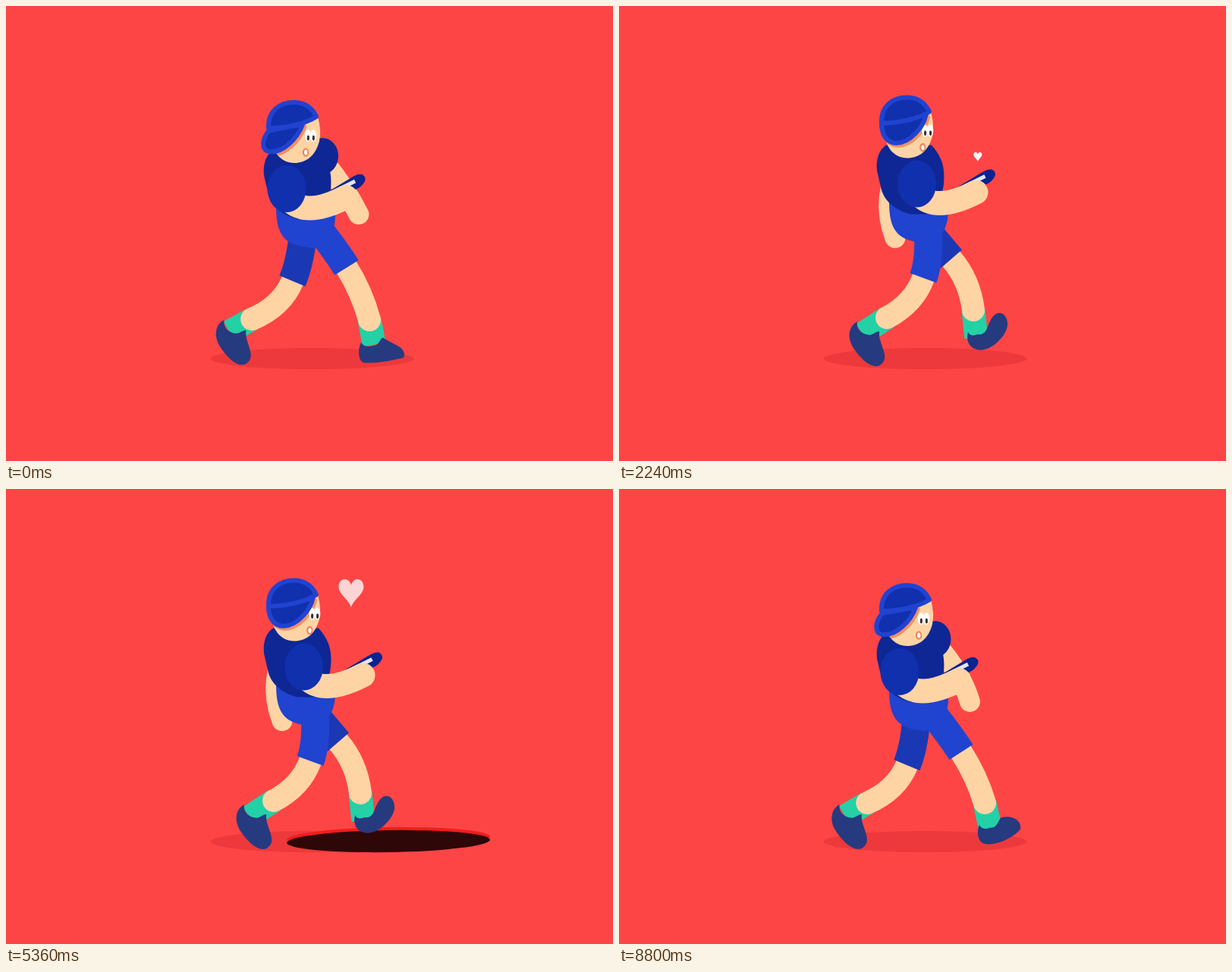
These frames come from a looping animation (800x600 px, 8.84 s). An HTML page with a canvas:

```html
<!DOCTYPE html>
<html lang="en">
<head>
<meta charset="utf-8">
<title>Walking with a phone</title>
<style>
html, body { margin: 0; width: 100%; height: 100%; overflow: hidden; background: #fe4545; }
canvas { display: block; }
</style>
</head>
<body>
<canvas id="stage" width="800" height="600"></canvas>
<script>
const ctx = document.getElementById('stage').getContext('2d');
const TAU = Math.PI * 2, STEP = 40, FRAMES = 221, CYCLE = 39, SPEED = 11.26;
const C = {
  bg: '#fe4545', shade: '#ed393b', shirt: '#0e2795', sleeve: '#1030ae', blue: '#2043d0',
  farShort: '#1b38b4', skin: '#ffd4a5', sock: '#24d0a6', shoe: '#263a80',
  phone: '#0c2390', hair: '#f58e66', hole: '#2e0709', rim: '#f41c1c'
};

const mix = (a, b, t) => a + (b - a) * t;
const mod = (a, n) => ((a % n) + n) % n;

function fill(path, color) {
  ctx.fillStyle = color;
  ctx.fill(new Path2D(path));
}
function line(path, color, width, cap = 'butt') {
  ctx.strokeStyle = color;
  ctx.lineWidth = width;
  ctx.lineCap = cap;
  ctx.lineJoin = 'round';
  ctx.stroke(new Path2D(path));
}
function oval(x, y, rx, ry, color, turn = 0) {
  ctx.fillStyle = color;
  ctx.beginPath();
  ctx.ellipse(x, y, rx, ry, turn, 0, TAU);
  ctx.fill();
}
function at(x, y, draw) {
  ctx.save();
  ctx.translate(x, y);
  draw();
  ctx.restore();
}

// time, hem x, hem y (from the body), hem angle, ankle x, y, foot x, y, foot angle
const STRIDE = [
  [0, 449, 345, 32, 479, 414, 484, 440, -7],
  [5, 431, 356, 11, 436, 413, 437, 440, 0],
  [11, 416, 349, -2, 399, 413, 387, 439, 0],
  [17, 401, 365, -20, 353, 411, 327, 428, 55],
  [19.2, 390, 363, -23, 337, 414, 314, 427, 55],
  [21, 399, 360, -20, 346, 402, 315, 417, 68],
  [24.5, 406, 356, -10, 358, 380, 334, 391, 80],
  [30.5, 460, 300, 51, 470, 356, 463, 377, 35],
  [36.5, 451, 340, 41, 480, 401, 483, 430, -40],
  [38, 451, 347, 33, 482, 414, 488, 441, -22]
];

// Smooth periodic curve through the stride poses
function stride(phase) {
  const n = STRIDE.length, q = mod(phase, CYCLE);
  let i = n - 1;
  while (STRIDE[i][0] > q) i--;
  const row = k => STRIDE[mod(k, n)];
  const time = k => row(k)[0] + Math.floor(k / n) * CYCLE;
  const [t0, t1, t2, t3] = [i - 1, i, i + 1, i + 2].map(time);
  const d = t2 - t1, s = (q - t1) / d, s2 = s * s, s3 = s2 * s;
  return row(i).map((b, k) => {
    const a = row(i - 1)[k], c = row(i + 1)[k], e = row(i + 2)[k];
    const m1 = (c - a) / (t2 - t0) * d, m2 = (e - b) / (t3 - t1) * d;
    return (2 * s3 - 3 * s2 + 1) * b + (s3 - 2 * s2 + s) * m1 + (3 * s2 - 2 * s3) * c + (s3 - s2) * m2;
  }).slice(1);
}

// Two bounces per step
const BOUNCE = [[0, 0], [4.5, -20], [10, 0], [14.2, -22], [18.6, 0], [19.5, 0]];
function bounce(phase) {
  const u = mod(phase, CYCLE / 2);
  const i = BOUNCE.findIndex(k => k[0] > u);
  const [a, b] = [BOUNCE[i - 1], BOUNCE[i]];
  return mix(a[1], b[1], (1 - Math.cos(Math.PI * (u - a[0]) / (b[0] - a[0]))) / 2);
}

// Soft shoe: a start point, then cubic curves for heel, sole, toe, tongue and opening
const SHOE = {
  flat: [-17, 4, -23, 14, -22, 32, -14, 32, 4, 32, 26, 32, 40, 31, 46, 17, 24, 14, 12, 0, 8, -3, 7, 9, -1, 9, -8, 11, -15, 10, -17, 4],
  bent: [-17, 4, -19, 16, -8, 28, 10, 28, 28, 28, 46, 24, 47, 12, 48, -6, 22, -2, 11, -12, 8, -14, 9, -4, 7, 0, 2, 8, -10, 11, -17, 4],
  toeUp: [-10, 0, -13, 12, -8, 21, 2, 23, 20, 28, 44, 2, 42, -12, 41, -26, 27, -32, 19, -14, 15, -8, 15, 5, 2, 3, -4, 6, -8, 4, -10, 0]
};
function shoe(turn) {
  const goal = turn > 0 ? SHOE.bent : SHOE.toeUp;
  const t = Math.min(1, turn > 0 ? turn / 35 : -turn / 40);
  const [x, y, ...curves] = SHOE.flat.map((v, i) => mix(v, goal[i], t));
  if (turn > 0) ctx.rotate(turn * Math.PI / 180);
  fill(`M${x} ${y}C${curves.join(' ')}Z`, C.shoe);
}

function leg(phase, dx, dy, shortColor) {
  const [kx, ky0, hem, ax, ay, fx, fy, turn] = stride(phase);
  const ky = ky0 + dy, a = hem * Math.PI / 180, tx = Math.sin(a), ty = Math.cos(a);
  const reach = Math.hypot(ax - kx, ay - ky) / 2;
  at(dx, 0, () => {
    line(`M${ax} ${ay}L${mix(ax, fx, 1.25)} ${mix(ay, fy, 1.25)}`, C.sock, 31);
    at(fx, fy, () => shoe(turn));
    line(`M${kx - tx * 4} ${ky - ty * 4}L${kx} ${ky}Q${kx + tx * reach} ${ky + ty * reach} ${ax} ${ay}`, C.skin, 30, 'round');
    line(`M406 ${286 + dy}Q${kx - tx * 30} ${ky - ty * 30} ${kx} ${ky}`, shortColor, 37);
  });
}

function farArm(c, s, angle) {
  const k = Math.cos(angle - 0.2);
  const x = 395 + 22 * c * Math.abs(c);
  const hx = 410 + 56 * k, hy = 308 - (k > 0 ? 36 * k ** 4 : 5 * k);
  const bx = (x + hx) / 2 - 4 + 10 * c - 36 * s;
  const by = (203 + hy) / 2 + 80 * Math.max(0, s * c);
  line(`M${x} 203Q${bx} ${by} ${hx} ${hy}`, C.skin, 27, 'round');
  oval(x, 198, 21, 24, C.shirt);
}

const FACE = 'M349 160L411 146Q416 165 413 178C408 198 395 207 380 207C362 207 349 192 349 165Z';
function head(h) {
  const m = (a, b) => mix(a, b, h);
  const flap = `M${m(347, 346)} ${m(164, 160)}C${m(338, 346)} ${m(174, 175)} ${m(335, 353)} ${m(190, 187)} `
    + `${m(347, 366)} ${m(192, 187)}C${m(365, 385)} ${m(194, 187)} ${m(384, 402)} ${m(175, 165)} ${m(391, 405)} ${m(156, 150)}Z`;
  fill(FACE, C.skin);
  ctx.save();
  ctx.clip(new Path2D(FACE));
  at(2.5, 3, () => { fill(flap, C.hair); line(flap, C.hair, 6); });
  ctx.restore();
  at(5.5 * h, 0, () => {
    for (const x of [398, 405]) {
      oval(x, 171, 4, 8, '#fff');
      oval(x + 0.3, 174, 1.6, 3.4, '#3a3033');
    }
    oval(395, 193, 4.2, 5.7, '#ee8558');
    oval(395.2, 193, 2.1, 3.4, '#fff');
  });
  const dome = 'M346 161C345 138 361 127 380 127C396 127 405 137 409 146C395 155 370 161 346 161Z';
  for (const part of [flap, dome]) {
    fill(part, C.sleeve);
    line(part, C.blue, 6);
  }
}

function nearArm() {
  fill('M432 247L465 227Q474 221 480 222Q486 225 484 231Q480 238 474 241L450 249Z', C.phone);
  line('M445 244L471 231', '#e3e6f2', 5);
  line('M386 257C402 272 428 268 459 252', C.skin, 32, 'round');
  oval(381, 241, 25.5, 31, C.sleeve);
}

function shadow(phase, size) {
  const u = mod(phase, CYCLE / 2);
  const dip = u > 2 && u < 15 ? Math.sin(Math.PI * (u - 2) / 13) ** 2 : 0;
  oval(403.5, 465, (134 - 46 * dip) * size, 14 * size, C.shade);
}

function walker(phase) {
  const angle = phase / CYCLE * TAU, c = Math.cos(angle), s = Math.sin(angle), dy = bounce(phase);
  at(0, dy, () => farArm(c, s, angle));
  leg(phase + CYCLE / 2, -13, dy, C.farShort);
  at(0, dy, () => fill('M356 262C356 290 359 314 395 318L405 319C425 315 434 298 434 275L430 255Z', C.blue));
  leg(phase, 0, dy, C.blue);
  at(0, dy, () => {
    fill('M352 190C340 198 338 215 341 228L345 245C348 262 362 275 384 281L405 281C425 270 430 245 428 224C427 210 420 199 412 190Z', C.shirt);
    head((1 - c) / 2);
    at(0.5 - 11.5 * c + s, 0, nearArm);
  });
}

const HEARTS = [4, 53.7, 79.3, 85.5, 121];
function heart(age) {
  if (age < 0 || age > 18.2) return;
  const w = Math.min(33, 6 + 2.2 * age);
  at(464 + 10 * Math.cos(Math.PI * age / 15), 212 - 5.75 * age, () => {
    ctx.globalAlpha = Math.max(0, Math.min(1, 1 - (age - 11.8) * 0.155));
    ctx.scale(w, w);
    fill('M0 .57C-.1 .25-.5 .05-.5-.25C-.5-.62-.08-.66 0-.31C.08-.66 .5-.62 .5-.25C.5 .05 .1 .25 0 .57Z', '#fdf4f4');
  });
}

const FALL = 142;
function draw(f) {
  const holeX = 504 - SPEED * (f - 134), tilt = -0.015;
  const n = Math.max(0, f - FALL);
  const entry = Math.max(0, 100 + (187 - f) * SPEED);
  const entryPhase = f - FRAMES;
  ctx.fillStyle = C.bg;
  ctx.fillRect(0, 0, 800, 600);

  if (n < 4) shadow(f, 1 - n / 4);
  if (holeX > -150 && holeX < 950) {
    oval(holeX, 460.5, 134, 14.5, C.rim, tilt);
    oval(holeX, 464.5, 134, 14.5, C.hole, tilt);
  }
  if (n < 10) {
    ctx.save();
    if (n) {
      // Only the part above the front edge of the hole stays visible
      ctx.beginPath();
      ctx.rect(0, 0, 800, 464);
      ctx.ellipse(holeX, 464.5, 134, 14.5, tilt, 0, TAU);
      ctx.clip();
    }
    at(-n * SPEED, 4.5 * n * n, () => walker(f));
    ctx.restore();
  }
  if (f > FALL && entry < 560) at(entry, 0, () => {
    shadow(entryPhase, 1);
    walker(entryPhase);
  });
  for (const start of HEARTS) heart(f - start);
}

const begin = performance.now();
function tick() {
  draw(Math.floor((performance.now() - begin) / STEP) % FRAMES);
  requestAnimationFrame(tick);
}
tick();
</script>
</body>
</html>
```
